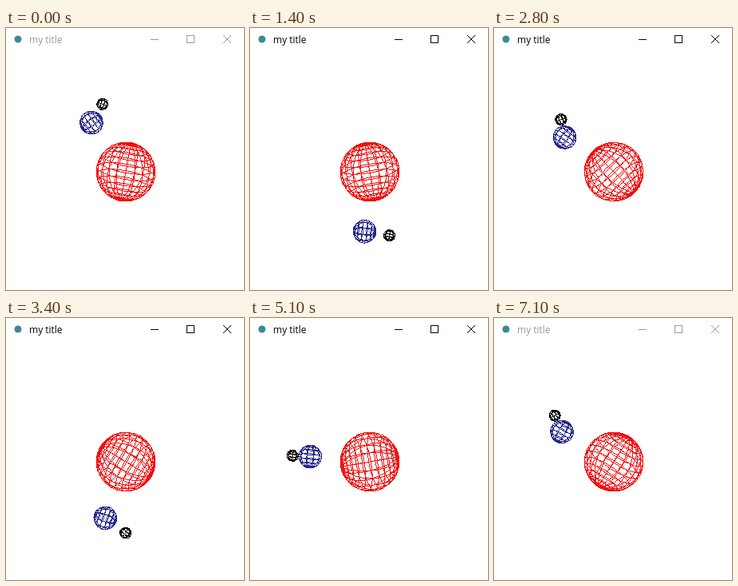
Write an HTML page with a canvas that moves like this. It is 298 by 328 pixels and loops after 7200 ms.

```html
<!DOCTYPE html>
<html>
<head>
<meta charset="utf-8">
<style>
  html, body { margin: 0; width: 100%; height: 100%; overflow: hidden; background: #fff; }
  canvas { display: block; }
</style>
</head>
<body>
<canvas id="stage" width="298" height="328"></canvas>
<script>
const ctx = document.getElementById('stage').getContext('2d');
const LOOP = 7200, TICK = 100, RAD = Math.PI / 180;
const CENTER = { x: 150, y: 180 };
const TILT = 15 * RAD;

// [tick, orbit degrees]: one key press, the repeat delay, then a held key
const ORBIT = [[0, 125], [1, 125], [2, 130], [6, 130], [14, 265], [28, 505],
  [40, 710], [51, 895], [61, 1070], [70, 1220], [71, 1230]];

function orbitAngle(tick) {
  const i = Math.max(1, ORBIT.findIndex(key => key[0] >= tick));
  const [t0, a0] = ORBIT[i - 1], [t1, a1] = ORBIT[i];
  return Math.round((a0 + (a1 - a0) * (tick - t0) / (t1 - t0)) / 5) * 5;
}

// One-pixel line without smoothing
function line(a, b) {
  const dx = b.x - a.x, dy = b.y - a.y;
  const steps = Math.max(1, Math.ceil(Math.max(Math.abs(dx), Math.abs(dy))));
  for (let i = 0; i <= steps; i++) {
    ctx.fillRect(Math.floor(a.x + dx * i / steps), Math.floor(a.y + dy * i / steps), 1, 1);
  }
}

function wireSphere(cx, cy, radius, slices, stacks, degrees, color) {
  const c = Math.cos(degrees * RAD), s = Math.sin(degrees * RAD);
  const point = (slice, stack) => {
    const lon = slice / slices * 2 * Math.PI, lat = stack / stacks * Math.PI;
    const x = Math.sin(lat) * Math.cos(lon);
    const y = Math.cos(lat) * Math.cos(TILT) - Math.sin(lat) * Math.sin(lon) * Math.sin(TILT);
    return { x: cx + radius * (x * c - y * s), y: cy - radius * (x * s + y * c) };
  };
  ctx.fillStyle = color;
  for (let i = 0; i < slices; i++) {
    for (let j = 0; j < stacks; j++) {
      const p = point(i, j);
      line(p, point(i, j + 1));
      if (j) line(p, point(i + 1, j));
    }
  }
}

function titleBar(active) {
  ctx.fillStyle = '#3c8a92';
  ctx.beginPath();
  ctx.arc(15, 14, 4.5, 0, 2 * Math.PI);
  ctx.fill();

  ctx.fillStyle = ctx.strokeStyle = active ? '#000' : '#999';
  ctx.font = '12px "Open Sans", "Noto Sans", sans-serif';
  ctx.fillText('my title', 29, 19);
  ctx.lineWidth = 1;
  ctx.fillRect(181, 14, 10, 1);
  ctx.strokeRect(226.5, 9.5, 9, 9);
  ctx.beginPath();
  ctx.moveTo(272, 9);
  ctx.lineTo(282, 19);
  ctx.moveTo(282, 9);
  ctx.lineTo(272, 19);
  ctx.stroke();
}

function draw(tick) {
  const degrees = orbitAngle(tick), a = degrees * RAD;
  const earth = {
    x: CENTER.x + 75 * Math.cos(a),
    y: CENTER.y - 75 * Math.sin(a)
  };
  const moon = {
    x: earth.x + 4.6 - 27 * Math.cos(2 * a),
    y: earth.y - 3.6 * Math.cos(a) + 27 * Math.sin(2 * a)
  };
  ctx.fillStyle = '#fff';
  ctx.fillRect(0, 0, 298, 328);
  titleBar(tick >= 1 && tick < 71);
  wireSphere(CENTER.x, CENTER.y, 37, 20, 14, degrees / 7 - 28, '#f01010');
  wireSphere(earth.x, earth.y, 14.5, 10, 8, degrees, '#28288a');
  wireSphere(moon.x, moon.y, 7.2, 8, 6, 2 * degrees, '#000');
}

const start = performance.now();
function frame() {
  draw(Math.floor((performance.now() - start) % LOOP / TICK));
  requestAnimationFrame(frame);
}
frame();
</script>
</body>
</html>
```
